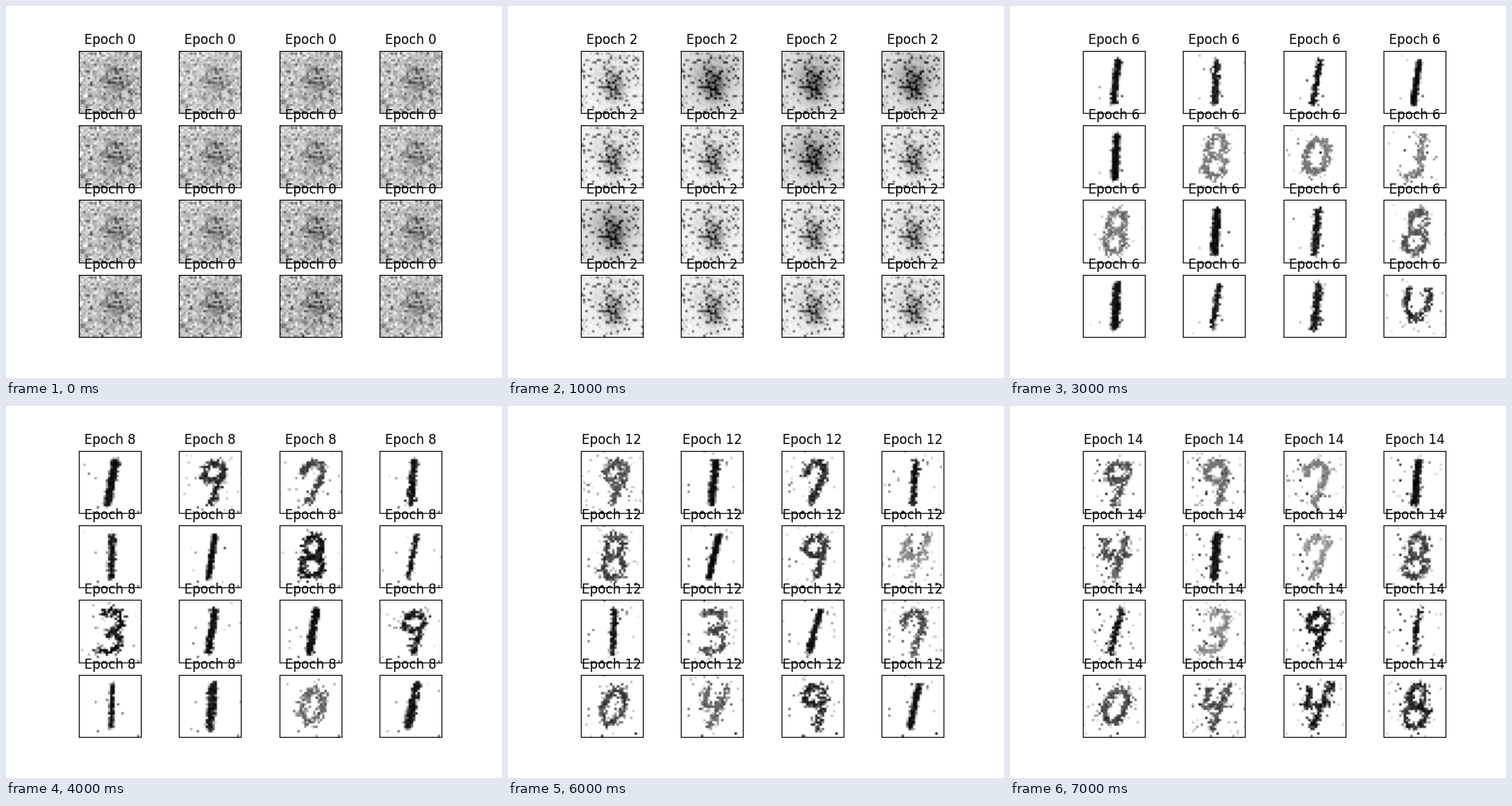
Animation of 640x480 px, one loop 8 s. Source, as a matplotlib script:

```python
import numpy as np
import matplotlib.pyplot as plt
from matplotlib.animation import FuncAnimation

N = 28
STEP = 2
YY, XX = np.mgrid[0:N, 0:N].astype(float)


def arc(cx, cy, rx, ry, start=0, stop=360):
    a = np.radians(np.linspace(start, stop, 17))
    return list(zip(cx + rx * np.cos(a), cy + ry * np.sin(a)))


# Strokes in a unit box, x to the right and y down
GLYPHS = {
    "0": [arc(.5, .5, .42, .4)],
    "1": [[(.5, 0), (.5, 1)]],
    "3": [arc(.4, .25, .45, .25, -130, 90), arc(.4, .75, .5, .25, -90, 130)],
    "4": [[(.1, .1), (.05, .5), (.95, .45)], [(.9, 0), (.5, 1)]],
    "7": [arc(.45, .3, .4, .28, 180, 360), [(.85, .3), (.5, 1)]],
    "8": [arc(.5, .25, .32, .25), arc(.5, .75, .42, .25)],
    "9": [arc(.5, .25, .4, .22), [(.88, .25), (.65, 1)]],
    "J": [[(.7, 0), (.65, .9), (.1, 1)]],
    "U": [arc(.5, .3, .45, .5, -20, 200)],
}

# What each tile resembles, by epoch, row by row
SHAPES = {
    6: "1111180J8118111U",
    8: "1971118131191101",
    10: "9911393111191871",
    12: "9171819413170491",
    14: "9971417813910448",
}
HAZY = (1, 2, 3, 6, 8)


def distance(strokes):
    best = np.full((N, N), 99.0)
    for stroke in strokes:
        for (xa, ya), (xb, yb) in zip(stroke, stroke[1:]):
            dx, dy = xb - xa, yb - ya
            t = ((XX - xa) * dx + (YY - ya) * dy) / (dx * dx + dy * dy)
            t = np.clip(t, 0, 1)
            best = np.minimum(best, np.hypot(XX - xa - t * dx,
                                             YY - ya - t * dy))
    return best


def place(name, lean, width=11, height=18, cx=14.2, cy=13.8):
    return [[(cx + (u - .5) * width + (.5 - v) * lean, cy + (v - .5) * height)
             for u, v in stroke] for stroke in GLYPHS[name]]


def blob(x, y, rx, ry):
    return np.exp(-((XX - x) / rx) ** 2 - ((YY - y) / ry) ** 2)


def digit(rng, strokes, pen, dark, rough):
    d = distance(strokes) + rough * rng.normal(0, .9, (N, N))
    grain = 1 - .35 * rough * rng.random((N, N))
    return dark * grain * np.clip((pen - d) * 1.3 + .3, 0, 1)


def specks(rng, density):
    return (rng.random((N, N)) < density) * rng.uniform(.1, 1, (N, N))


def first_noise():
    """Light grain with a darker patch right of the middle."""
    rng = np.random.default_rng(3)
    base = .21 + .1 * rng.normal(size=(N, N)) + .45 * specks(rng, .15)
    base += blob(17, 13, 6, 7) * .55 * rng.random((N, N)) ** 1.5
    bars = distance([[(10, 12), (14, 15.5)], [(5.5, 20), (12, 20.5)]])
    base += .35 * np.clip(1.1 - bars, 0, 1) * rng.random((N, N))
    return [base * g for g in rng.normal(1, .04, 16)]


def dark_cloud():
    """Scattered dots that thicken towards a dark core."""
    rng = np.random.default_rng(8)
    cloud = blob(14, 12, 8, 9)
    core = blob(14.5, 17, 3, 5) * rng.uniform(.1, 1, (N, N))
    dots = (rng.random((N, N)) < .14 + .3 * cloud) * rng.random((N, N))
    base = .7 * core + .7 * dots + .06 * rng.random((N, N))
    base += .25 * cloud * rng.random((N, N))
    haze = .1 + .25 * cloud
    return [base + haze * (.8 if i in HAZY else .15) for i in range(16)]


def first_digits():
    """One shared figure, with a second one now and then."""
    rng = np.random.default_rng(14)
    base = .03 + .06 * rng.random((N, N)) + .4 * specks(rng, .08)
    halo = blob(14, 13, 7, 10) * rng.uniform(0, .3, (N, N))
    eight = digit(rng, place("8", 4, 8, 17, 14, 13), 1.5, .75, .7)
    eight += .4 * blob(16.5, 6, 3, 2) + .3 * blob(12, 21, 3, 1.5)
    nine = digit(rng, place("9", 3, 11, 15), 1.5, .85, .8)
    nine += .7 * specks(rng, .12)
    tiles = [(nine if i in (6, 9) else eight) + base + halo
             for i in range(16)]
    tiles[3] = tiles[3] + .08 + .5 * halo
    return tiles


def later_digits(epoch):
    """Separate figures; leaning and specks grow with training."""
    rng = np.random.default_rng(epoch)
    density = .002 * (epoch - 4)
    common = specks(rng, density)
    tiles = []
    for name in SHAPES[epoch]:
        lean = rng.uniform(.5, 1 + epoch / 3)
        if name == "1":
            pen, dark, rough = rng.uniform(1.3, 2), 1, rng.uniform(.2, .6)
            mess = density / 2
        else:
            pen, dark = 1.6, rng.uniform(.5, 1.1)
            rough = rng.uniform(.6, 1.1)
            mess = density / 2 + .05 * rng.random()
        tile = digit(rng, place(name, lean), pen, dark, rough)
        dirt = specks(rng, mess) * blob(14, 14, 14, 14)
        tiles.append(np.maximum(tile, np.maximum(common, dirt)))
    return tiles


tiles = [first_noise(), dark_cloud(), first_digits()]
tiles += [later_digits(epoch) for epoch in SHAPES]
tiles = np.clip(tiles, 0, 1)

fig, axes = plt.subplots(4, 4, figsize=(6.4, 4.8), dpi=100)
images = []
for ax in axes.flat:
    images.append(ax.imshow(np.zeros((N, N)), cmap="gray_r", vmin=0, vmax=1))
    ax.set_xticks([])
    ax.set_yticks([])


def draw(frame):
    for ax, image, tile in zip(axes.flat, images, tiles[frame]):
        image.set_data(tile)
        ax.set_title(f"Epoch {frame * STEP}")
    return images


anim = FuncAnimation(fig, draw, frames=len(tiles), interval=1000,
                     repeat=True, repeat_delay=0)
plt.show()
```
